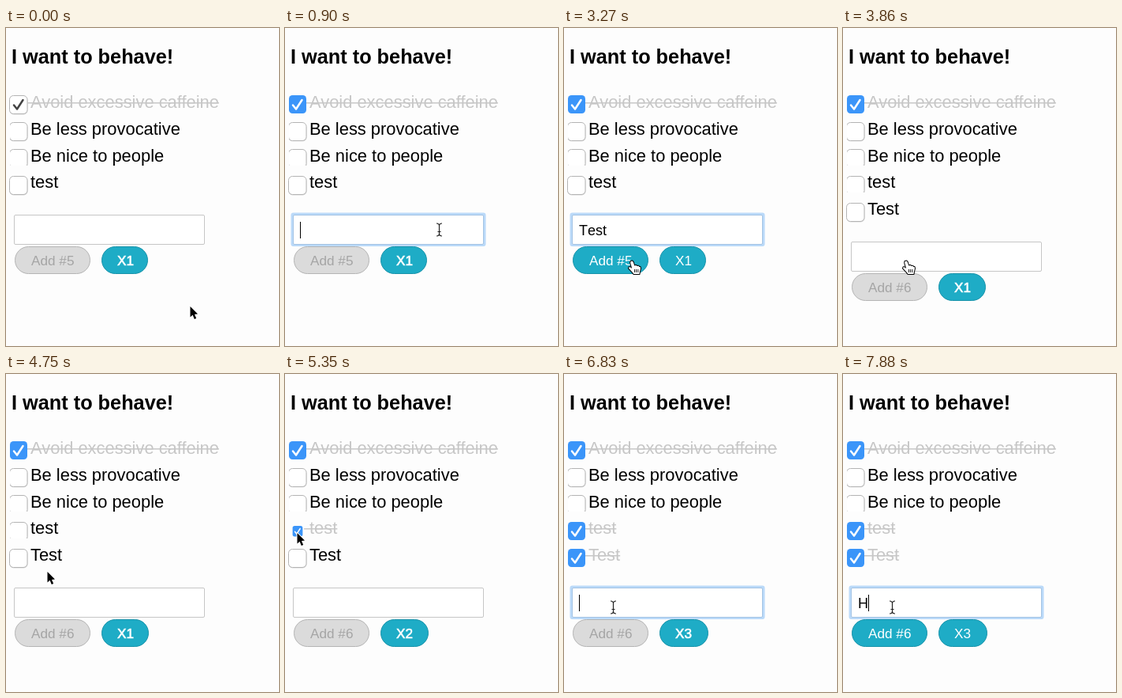
Animation, 346 px wide and 402 px high, one loop 8 s. Source, as an HTML page with a canvas:

```html
<!DOCTYPE html>
<html lang="en">
<head>
<meta charset="utf-8">
<title>To-do list</title>
<style>
html, body { margin: 0; width: 100%; height: 100%; overflow: hidden; background: #fdfdfd; }
canvas { display: block; width: 346px; height: 402px; }
</style>
</head>
<body>
<canvas id="stage"></canvas>
<script>
const W = 346, H = 402, LOOP = 8000;
const FONT = '"Liberation Sans", Arial, sans-serif';
const BG = '#fdfdfd', BLUE = '#3b95f9', TEAL = '#1eacc6';

const canvas = document.getElementById('stage');
const ctx = canvas.getContext('2d');
const ratio = window.devicePixelRatio || 1;
canvas.width = W * ratio;
canvas.height = H * ratio;

// Times of the interactions, in ms
const FOCUS_1 = 900, SUBMIT = 3570, CHECK_4 = 5350, CHECK_5 = 6240, FOCUS_2 = 6830;
const POP = 295;

// [time, value] lists; a value holds until the next entry
const typed = [[0, ''], [2090, 'T'], [2390, 'Tes'], [2680, 'Test'], [SUBMIT, ''], [7880, 'H']];
const caret = [[0, false], [FOCUS_1, true], [1340, false], [1940, true], [3120, false],
  [FOCUS_2, true], [7430, false], [7730, true]];

// [time, kind, x, y]
const pointer = [
  [0, 'arrow', 233, 352], [450, 'arrow', 230, 344], [600, 'arrow', 217, 312],
  [750, 'arrow', 203, 277], [900, 'beam', 195, 255], [1050, 'beam', 193, 251],
  [2980, 'beam', 170, 259], [3120, 'arrow', 111, 284], [3270, 'hand', 87, 295],
  [3710, 'hand', 83, 295], [3860, 'hand', 81, 295],
  [4310, 'beam', 79, 291], [4460, 'beam', 70, 276], [4610, 'arrow', 52, 250],
  [4760, 'arrow', 35, 228], [4900, 'arrow', 24, 212], [5050, 'arrow', 17, 203],
  [5200, 'arrow', 15, 201], [5790, 'arrow', 15, 206], [5940, 'arrow', 14, 222],
  [6090, 'arrow', 13, 232], [6540, 'arrow', 16, 238], [6690, 'beam', 45, 274],
  [6830, 'beam', 62, 295]
];

const items = [
  { text: 'Avoid excessive caffeine', checked: -LOOP },
  { text: 'Be less provocative', checked: Infinity },
  { text: 'Be nice to people', checked: Infinity },
  { text: 'test', checked: CHECK_4 },
  { text: 'Test', checked: CHECK_5 }
];

function current(list, t) {
  let found = list[0];
  for (const entry of list) if (entry[0] <= t) found = entry;
  return found;
}

function box(x, y, w, h, r, fill, stroke) {
  ctx.beginPath();
  ctx.roundRect(x, y, w, h, r);
  ctx.fillStyle = fill;
  ctx.fill();
  if (stroke) {
    ctx.strokeStyle = stroke;
    ctx.lineWidth = 1;
    ctx.stroke();
  }
}

function label(text, x, y, size, color, weight = 'normal') {
  ctx.font = `${weight} ${size}px ${FONT}`;
  ctx.fillStyle = color;
  ctx.fillText(text, x, y);
  return ctx.measureText(text).width;
}

function tick(color) {
  ctx.beginPath();
  ctx.moveTo(-6, 0.5);
  ctx.lineTo(-2, 5.5);
  ctx.lineTo(5.5, -6);
  ctx.strokeStyle = color;
  ctx.lineWidth = 2.5;
  ctx.lineCap = ctx.lineJoin = 'round';
  ctx.stroke();
}

function checkbox(y, on, active, scale, last) {
  ctx.save();
  if (!on && !last) {
    ctx.beginPath();
    ctx.rect(5, y - 13, 24, y > 150 ? 22 : 25.5);
    ctx.clip();
  }
  ctx.translate(16, y);
  ctx.scale(scale, scale);
  if (on && active) {
    box(-11, -12, 22, 23, 4.5, BLUE);
    tick('#fff');
  } else {
    box(-11.5, -10.5, 23, 23, 5, '#d9d9d9');
    box(-11.5, -11.5, 22.5, 23, 5, '#fff', '#b4b4b4');
    if (on) tick('#434343');
  }
  ctx.restore();
}

function row(item, i, t, last) {
  const on = t >= item.checked;
  const popping = on && t - item.checked < POP - 5;
  const base = Math.round(101 + i * 33.75);
  checkbox(97 + Math.round(i * 33.9), on, t >= FOCUS_1, popping ? 0.58 : 1, last);
  const width = label(item.text, 31, base, 21.9, on ? '#c7c7c7' : '#000');
  if (on) {
    ctx.fillStyle = '#c7c7c7';
    ctx.fillRect(popping ? 24 : 27, base - 7, width + (popping ? 7 : 4), 1.5);
  }
}

function field(y, text, focused, showCaret) {
  if (focused) box(7.5, y - 2.5, 247, 42.5, 3, '#bbdaf9');
  box(10.5, y + 0.5, 241, 37, 1.5, '#fff', focused ? '#a3c3e4' : '#c6c6c6');
  ctx.fontKerning = 'none';
  const width = label(text, 19, y + 26, 18, '#000');
  ctx.fontKerning = 'auto';
  if (showCaret) {
    ctx.fillStyle = '#000';
    ctx.fillRect(Math.round(19 + width), y + 9, 1, 21);
  }
}

function button(text, x, y, w, textX, enabled, heavy) {
  box(x + 0.5, y + 0.5, w - 1, 34, 17, enabled ? TEAL : '#dbdbdb', enabled ? '#1893aa' : '#b5b5b5');
  label(text, textX, y + 24, 17.2, enabled ? '#fff' : '#a5a5a5');
  if (heavy) {
    ctx.strokeStyle = '#fff';
    ctx.lineWidth = 0.6;
    ctx.strokeText(text, textX, y + 24);
  }
}

function outline(points, fill, stroke, width) {
  ctx.beginPath();
  points.forEach(([x, y]) => ctx.lineTo(x, y));
  ctx.closePath();
  ctx.lineJoin = 'round';
  ctx.strokeStyle = stroke;
  ctx.lineWidth = width;
  ctx.stroke();
  ctx.fillStyle = fill;
  ctx.fill();
}

const cursors = {
  arrow() {
    outline([[0.5, 0], [0.5, 13.5], [3.6, 10.8], [5.8, 16], [8.2, 15], [6, 10], [10, 9.6]],
      '#000', '#fff', 2);
  },
  beam() {
    for (const [color, width] of [['#fff', 3], ['#222', 1.2]]) {
      ctx.beginPath();
      ctx.moveTo(-3, -8);
      ctx.quadraticCurveTo(0.5, -8, 0.5, -5);
      ctx.lineTo(0.5, 5);
      ctx.quadraticCurveTo(0.5, 8, -3, 8);
      ctx.moveTo(4, -8);
      ctx.quadraticCurveTo(0.5, -8, 0.5, -5);
      ctx.moveTo(0.5, 5);
      ctx.quadraticCurveTo(0.5, 8, 4, 8);
      ctx.moveTo(-1.5, 2.5);
      ctx.lineTo(2.5, 2.5);
      ctx.strokeStyle = color;
      ctx.lineWidth = width;
      ctx.stroke();
    }
  },
  hand() {
    outline([[-2.5, 0], [-0.5, -0.5], [0.8, 1], [2.3, 5.5], [4.5, 5], [5.5, 6], [7.5, 5.8],
      [8.3, 7], [9.6, 7], [10, 9], [9, 13], [8.5, 16], [1.5, 16], [-1, 13], [-5, 8.8],
      [-4.5, 7.3], [-2.8, 7.4], [-0.8, 9], [-2.8, 2]], '#fff', '#000', 2);
    ctx.fillStyle = '#000';
    for (const x of [2, 4.2, 6.4]) ctx.fillRect(x, 10, 0.9, 4);
  }
};

function draw(t) {
  ctx.setTransform(ratio, 0, 0, ratio, 0, 0);
  ctx.fillStyle = BG;
  ctx.fillRect(0, 0, W, H);
  label('I want to behave!', 7, 45, 25.3, '#000', 'bold');

  const count = t < SUBMIT ? 4 : 5;
  items.slice(0, count).forEach((item, i) => row(item, i, t, i === count - 1));

  const shift = count === 5 ? 34 : 0;
  const text = current(typed, t)[1];
  const focused = (t >= FOCUS_1 && t < SUBMIT) || t >= FOCUS_2;
  field(236 + shift, text, focused, current(caret, t)[1]);

  const done = items.filter(item => t >= item.checked).length;
  const ready = text !== '';
  button(`Add #${count + 1}`, 11, 276 + shift, 96, 32, ready, false);
  button(`X${done}`, 121, 276 + shift, 54 + count + done, 141, true, !ready);

  const [, kind, x, y] = current(pointer, t);
  ctx.save();
  ctx.translate(x, y);
  ctx.lineCap = 'butt';
  cursors[kind]();
  ctx.restore();
}

const start = performance.now();
function frame() {
  draw((performance.now() - start) % LOOP);
  requestAnimationFrame(frame);
}
frame();
</script>
</body>
</html>
```
